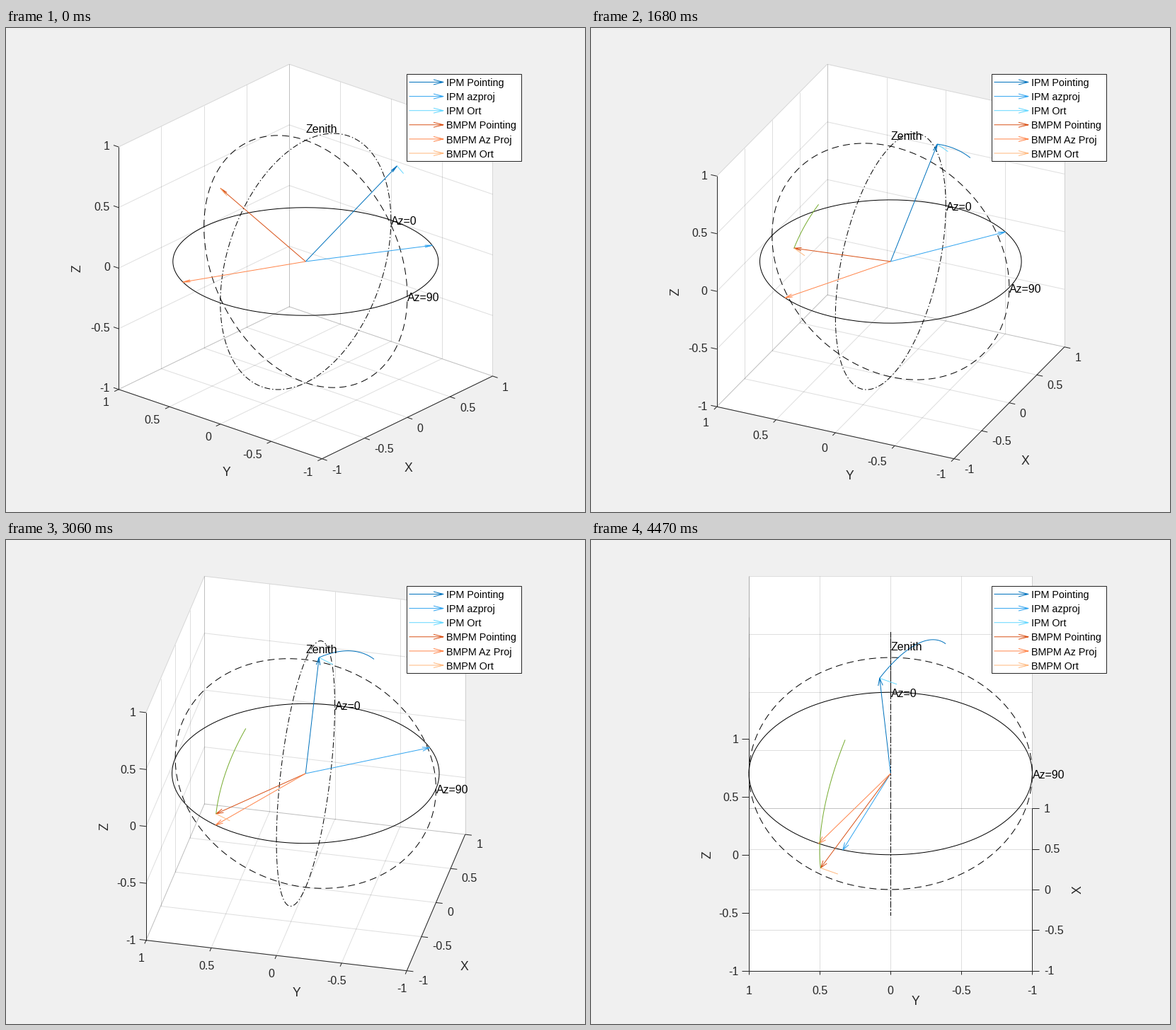
Recreate the animation shown at these times as a matplotlib script. Size 818 by 684 pixels, loop 4500 ms.

```python
import numpy as np
import matplotlib.pyplot as plt
from matplotlib.animation import FuncAnimation
from matplotlib.collections import LineCollection
from matplotlib.patches import Polygon, Rectangle

W, H, DPI = 818, 684, 100
FRAMES, INTERVAL = 150, 30
PX = 72 / DPI                       # points per pixel
CX, CY, BOX_H = 423.3, 330.0, 557.46
TICKS = [-1, -0.5, 0, 0.5, 1]
DARK = (0.15, 0.15, 0.15)
BLUE = np.array([0, 0.447, 0.741])
RED = np.array([0.85, 0.325, 0.098])
GREEN = (0.466, 0.674, 0.188)
HEADING = np.radians(29.5)
ALONG = np.array([np.cos(HEADING), -np.sin(HEADING), 0])
ACROSS = np.array([np.sin(HEADING), np.cos(HEADING), 0])
ORT = -0.14 * ACROSS + [0, 0, -0.004]

plt.rcParams["font.family"] = "Liberation Sans"
fig = plt.figure(figsize=(W / DPI, H / DPI), dpi=DPI, facecolor="#f0f0f0")
ax = fig.add_axes([0, 0, 1, 1])
ax.set_xlim(0, W)
ax.set_ylim(H, 0)
ax.axis("off")


def tint(color, amount):
    return tuple(np.minimum(color + amount, 1))


class Camera:
    """Orthographic view whose scale always fills the plot height."""

    def __init__(self, k):
        az, el = np.radians(50 + 40 * k), np.radians(24 + 11 * k)
        self.ca, self.sa = np.cos(az), np.sin(az)
        self.ce, self.se = np.cos(el), np.sin(el)
        self.scale = BOX_H / 2 / (self.ce + self.se * (self.ca + self.sa))

    def vec(self, p):
        x, y, z = np.moveaxis(np.asarray(p, float), -1, 0)
        u = x * self.ca - y * self.sa
        v = self.se * (x * self.sa + y * self.ca) + z * self.ce
        return self.scale * np.stack([u, -v], axis=-1)

    def at(self, p):
        return self.vec(p) + [CX, CY]


def sweep(k):
    return np.radians(46.1 - 59.2 * np.asarray(k, float))


def upper(k):
    """Pointing that climbs over the zenith."""
    s = np.sin(sweep(k))[..., None]
    w = (-0.039 - 0.04 * k * (1 - k))[..., None]
    p = s * ALONG + w * ACROSS
    p[..., 2] = np.sqrt(1 - (s**2 + w**2)[..., 0])
    return p


def lower(k):
    """Pointing that sinks below the horizon."""
    el = sweep(k)
    az = np.radians(207.6 + 3.6 * k - 0.7 * k**2)
    return np.stack([np.cos(el) * np.cos(az), -np.cos(el) * np.sin(az), np.sin(el)], axis=-1)


def flat(p):
    q = p * [1, 1, 0]
    return q / np.linalg.norm(q)


def arrow_path(start, tip, length, half):
    d = (tip - start) / np.hypot(*(tip - start))
    n = np.array([-d[1], d[0]])
    base = tip - length * d
    gap = [np.nan, np.nan]
    return np.array([start, tip, gap, base + half * n, tip, base - half * n])


def line(color, z, **kw):
    return ax.plot([], [], color=color, lw=PX, zorder=z, solid_capstyle="butt", **kw)[0]


def label(s, size=16, color=DARK, ha="left", z=6, **kw):
    return ax.text(0, 0, s, fontsize=size * PX, color=color, ha=ha, zorder=z, **kw)


def put(t, x, y):
    """Centre the capitals of a horizontal text on y."""
    t.set_position((x, y + 0.36 * t.get_fontsize() / PX))


def put_upright(t, x, y):
    t.set(rotation=90, va="center", ha="center", position=(x + 1.8, y))


# Walls, grid and axes
walls = [Polygon([[0, 0]] * 4, fc="white", ec="none", zorder=0) for _ in range(3)]
for wall in walls:
    ax.add_patch(wall)
WALLS = [
    [(1, -1, -1), (1, 1, -1), (1, 1, 1), (1, -1, 1)],
    [(-1, 1, -1), (1, 1, -1), (1, 1, 1), (-1, 1, 1)],
    [(-1, -1, -1), (1, -1, -1), (1, 1, -1), (-1, 1, -1)],
]
GRID = np.array([seg for t in TICKS for seg in (
    [(1, t, -1), (1, t, 1)], [(1, -1, t), (1, 1, t)],
    [(t, 1, -1), (t, 1, 1)], [(-1, 1, t), (1, 1, t)],
    [(t, -1, -1), (t, 1, -1)], [(-1, t, -1), (1, t, -1)])], float)
AXES = [
    [(-1, 1, -1), (-1, 1, 1)],
    [(-1, 1, -1), (-1, -1, -1)],
    [(-1, -1, -1), (1, -1, -1)],
]
TICK = 0.05
TICK_MARKS = [seg for t in TICKS for seg in (
    [(-1, 1, t), (-1, 1 + TICK, t)],
    [(-1, t, -1), (-1 - TICK, t, -1)],
    [(t, -1, -1), (t, -1 - TICK, -1)])]
RULES = np.array(AXES + TICK_MARKS, float)

grid = LineCollection([], colors=[DARK + (0.15,)], linewidths=PX, zorder=1)
rules = LineCollection([], colors=[DARK], linewidths=PX, zorder=2)
ax.add_collection(grid)
ax.add_collection(rules)

x_nums, y_nums, z_nums = ([label(f"{t:g}") for t in TICKS] for _ in range(3))
x_name, y_name, z_name = (label(s, 17.6, ha="center") for s in "XYZ")

# Reference circles
turn = np.linspace(0, 2 * np.pi, 181)
c, s, o = np.cos(turn), np.sin(turn), np.zeros_like(turn)
CIRCLES = [np.stack(p, axis=-1) for p in ((c, s, o), (c, o, s), (o, c, s))]
circles = [
    line("black", 3),
    line("black", 3, dashes=(8, 3, 1.5, 3), dash_capstyle="butt"),
    line("black", 3, dashes=(10, 6), dash_capstyle="butt"),
]
MARKS = [("Zenith", (0, 0, 1.1)), ("Az=0", (1, 0, 0)), ("Az=90", (0, -1, 0))]
marks = [label(name, color="black") for name, _ in MARKS]

# Moving vectors: pointing, horizontal projection, orthogonal and trail
sets = []
for path, base, trail in ((upper, BLUE, tuple(BLUE)), (lower, RED, GREEN)):
    sets.append((path, line(tuple(base), 4), line(tint(base, 0.2), 4),
                 line(tint(base, 0.4), 4), line(trail, 4)))

# Legend
ax.add_patch(Rectangle((565.5, 64.5), 162, 123, fc="white", ec=DARK, lw=PX, zorder=8))
ENTRIES = [
    ("IPM Pointing", BLUE, 0), ("IPM azproj", BLUE, 0.2), ("IPM Ort", BLUE, 0.4),
    ("BMPM Pointing", RED, 0), ("BMPM Az Proj", RED, 0.2), ("BMPM Ort", RED, 0.4),
]
for i, (name, base, amount) in enumerate(ENTRIES):
    y = 76.5 + 20.1 * i
    key = arrow_path(np.array([569.5, y]), np.array([618.0, y]), 14, 3.5)
    line(tint(base, amount), 9).set_data(*key.T)
    put(label(name, 14.4, "black", z=9), 622, y + 0.5)


def place_numbers(cam, k):
    tick_x = cam.vec((0, -TICK, 0))
    tick_y = cam.vec((-TICK, 0, 0))
    y_centred = 50 + 40 * k > 74
    x_centred = 50 + 40 * k > 82.6
    for t, xn, yn, zn in zip(TICKS, x_nums, y_nums, z_nums):
        px, py = cam.at((t, -1, -1))
        drop = 2.5 * tick_x[1] if x_centred else 11.5 + 1.5 * tick_x[1]
        put(xn, px + tick_x[0] + 6.5, py + drop)

        px, py = cam.at((-1, t, -1))
        yn.set_ha("center" if y_centred else "right")
        shift = 3.3 * tick_y[0] if y_centred else tick_y[0] - 7
        put(yn, px + shift, py + 7.8 + 3.5 * tick_y[1])

        px, py = cam.at((-1, 1 + TICK, t))
        zn.set_ha("right")
        put(zn, px - 5, py + 0.5)

    px, py = cam.at((0, -1, -1))
    if x_centred:
        put_upright(x_name, px + 62.7 + 112 * (1 - k), py)
    else:
        x_name.set(rotation=0, va="baseline")
        put(x_name, px + 2 + 56 * k, py + 70.5 + 28 * k)
    px, py = cam.at((-1, 0, -1))
    put(y_name, px + 9 + 32 * k - 6 * k**2, py + 67 - 16 * k - 9 * k**2)
    px, py = cam.at((-1, 1, 0))
    put_upright(z_name, px - 59.5, py)


def draw(i):
    k = i / (FRAMES - 1)
    cam = Camera(k)
    for wall, corners in zip(walls, WALLS):
        wall.set_xy(cam.at(corners))
    grid.set_segments(cam.at(GRID))
    rules.set_segments(cam.at(RULES))
    place_numbers(cam, k)
    for ring, pts in zip(circles, CIRCLES):
        ring.set_data(*cam.at(pts).T)
    for text, (_, p) in zip(marks, MARKS):
        px, py = cam.at(p)
        put(text, px + 0.5, py + 1)

    centre = np.array([CX, CY])
    half = 1.5 + 1.8 * k
    past = np.arange(i + 1) / (FRAMES - 1)
    for path, point, proj, ort, trail in sets:
        pts = path(past)
        tip = pts[-1]
        point.set_data(*arrow_path(centre, cam.at(tip), 10.5, half).T)
        proj.set_data(*arrow_path(centre, cam.at(flat(tip)), 10.5, half).T)
        ort.set_data(*cam.at([tip, tip + ORT]).T)
        trail.set_data(*cam.at(pts).T)
    return []


anim = FuncAnimation(fig, draw, frames=FRAMES, interval=INTERVAL,
                     init_func=lambda: draw(0), repeat=True, repeat_delay=0)
plt.show()
```
